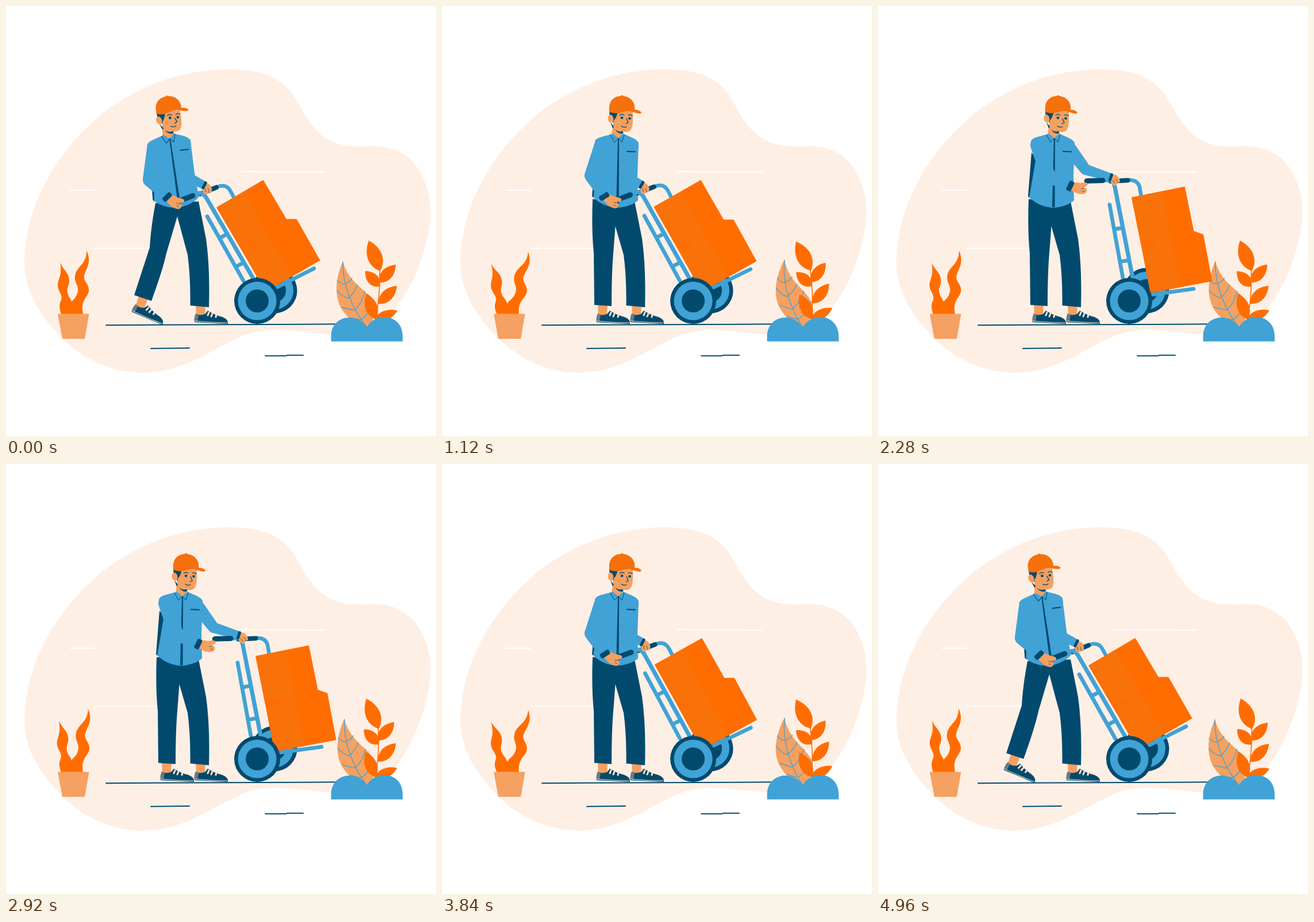
An HTML page that plays this animation: 748x748 px, repeating every 5 s.

```html
<!DOCTYPE html>
<html lang="en">
<head>
<meta charset="utf-8">
<title>Courier with hand truck</title>
<style>
  html, body { margin: 0; width: 100%; height: 100%; overflow: hidden; background: #fff; }
  svg { display: block; width: 100%; height: 100%; }
  .navy { fill: #014a6e; } .blue { fill: #41a2d6; } .orange { fill: #ff6d00; }
  .cap { fill: #f6700c; } .skin { fill: #f3a061; }
  .line { fill: none; stroke-linecap: round; stroke-linejoin: round; }
  .sNavy { stroke: #014a6e; } .sBlue { stroke: #41a2d6; }
</style>
</head>
<body>
<svg viewBox="0 0 748 748">
  <defs>
    <g id="shoe">
      <path class="skin" d="M-9-5 8-3 7 16-8 16Z"/>
      <path class="navy" d="M-9 13C-11 18-12 23-11 28L47 31C48 24 42 20 34 18 26 16 19 12 12 8L7 14C1 16-5 16-9 13Z"/>
      <path fill="#6c7a85" d="M-9 13C-11 18-12 23-11 27L-6 27-4 15Z"/>
      <path class="line" stroke="#fbd9bd" d="M-10 26Q18 29 46 29"/>
      <path class="line" stroke="#ffe3c8" stroke-width="3" d="M14 11 12 16M20 13 18 18M27 14 26 19"/>
    </g>
  </defs>

  <path fill="#feefe5" d="M380 110C440 109 480 122 503 160 528 205 546 240 603 244 640 246 660 238 692 258 728 282 742 330 738 375 731 428 709 488 674 531 645 566 600 574 560 571 520 568 480 561 445 565 380 573 330 638 235 638 180 637 130 612 95 575 60 540 30 495 32 440 36 340 90 250 170 185 230 140 300 112 380 110Z"/>
  <path class="line" stroke="#fff" stroke-width="2" d="M112 320.500H154M410 288 556 289M155 421.500H264"/>
  <path class="line sNavy" stroke-width="2" d="M174 555.200 580 553.300M252 595.700 319 595M451 608.500H487L489 607.600H517"/>

  <path id="flameL" class="orange" d="M94 446C100 460 110 464 110 478 110 487 105 490 107 499 109 507 112 508 114 514L124 536H96C93 527 92 521 95 514 101 502 89 497 90 484 91 474 98 468 94 446Z"/>
  <path id="flameR" class="orange" d="M140 425C152 450 134 461 136 474 138 482 145 485 144 496 142 508 129 511 134 536H106L114 514C119 510 126 502 125 491 124 484 119 480 120 470 122 452 141 450 140 425Z"/>
  <path fill="#f4a162" d="M90 535.500H144.500L137 579H98Z"/>

  <g id="tanLeaf">
    <path fill="#f4a162" d="M586 444C572 476 571 508 585 529 596 545 611 554 627 560 637 552 645 537 641 520 634 494 597 487 586 444Z"/>
    <path class="line sBlue" stroke-width="1.300" d="M586 445C585 483 602 527 627 558M576 477Q580 483 589 484Q600 479 602 473M576 495Q583 505 596 508Q607 498 611 485M584 524Q595 527 606 529Q620 517 624 496M598 542Q607 544 617 546Q632 537 638 513"/>
  </g>
  <g id="branch" class="orange"></g>
  <path class="blue" d="M565.500 583.500V574C566 554 580 542 597 542 610 542 621 548 627.500 559 634 548 644 541 658 541 676 541 690 554 690 574V583.500Z"/>

  <use id="rearShoe" href="#shoe"/>
  <use href="#shoe" x="339" y="522"/>
  <path id="legs" class="navy"/>
  <path id="rearArm" class="blue"/>

  <g id="torso">
    <path class="skin" d="M298 204 295 224 307 231 316 222 313 210Z"/>
    <path class="navy" d="M293 202 299 210 297 213ZM301 214Q307 221 316 217L314 222Q306 223 301 214Z"/>
    <path class="blue" d="M297 222C285 227 270 227 266 235L274 268 262 332C275 345 290 350 305 351 320 350 334 345 341 338L340 295 342 238C338 230 325 227 315 222L307 230Z"/>
    <path class="navy" d="M267 255 275 264 263 333 261 331Z"/>
    <path class="navy" d="M306 230H308L307.500 350H303Z"/>
    <path class="line sNavy" d="M293 224 300 237 307 230 313 237 317 224"/>
    <path class="line sNavy" stroke-width="2" d="M322 253 336 253.500"/>
    <path class="navy" d="M291 181H308L303 200 299 205 291.500 190Z"/>
    <path class="skin" d="M302 183 332 184C332 198 333 211 327 217 320 222 308 218 303 211L298 204Z"/>
    <ellipse class="skin" cx="293.500" cy="196" rx="5" ry="7" transform="rotate(-12 293.500 196)"/>
    <path class="navy" d="M296 183H306Q304 194 299 199Z"/>
    <circle class="navy" cx="313" cy="194.500" r="2.300"/><circle class="navy" cx="326.500" cy="195.500" r="2.300"/>
    <path class="line sNavy" stroke-width="1.300" d="M309 190Q313 187 317 190M324 190Q328 188 331 191M321 196 324 203 320 205M312 209Q316 212 321 210"/>
    <path class="cap" d="M291.500 184C288 165 300 157 311 156.500Q313 154 315.500 156.500C328 158 337 168 335 180.500 341 180 346 183 347 185.500 345 188.500 340 187 334 185 321 180 310 187 301 186.500 296 186 293 185 291.500 184Z"/>
  </g>

  <circle class="navy" cx="467" cy="495" r="39.500"/><circle class="blue" cx="467" cy="495" r="33"/><circle class="navy" cx="467" cy="495" r="20"/>
  <g id="cart">
    <path class="line sBlue" stroke-width="6.500" d="M368 314.500C380 310 387 315 391 323L405 349"/>
    <path class="line sNavy" stroke-width="8" d="M338 327 366 315.500"/>
    <path class="line sBlue" stroke-width="6.500" d="M472 489 536 456.500"/>
    <g id="boxes">
      <path class="orange" stroke="#ff6d00" stroke-width="3" stroke-linejoin="round" d="M368 351 447 304.500 487 372 504.500 372 544.500 442 452 495 411 424 408.500 420Z"/>
      <path fill="#f97109" d="M367 350 414 323 455 397 498 470 452 497 410 424Z"/>
      <ellipse class="orange" cx="424" cy="417" rx="11" ry="6" transform="rotate(-30 424 417)"/>
    </g>
    <path class="line sBlue" stroke-width="7.300" d="M326 329.500 333 326.500C340 323 344 327 348 333L433 479"/>
    <path class="line sBlue" stroke-width="6.700" d="M350 366 413 478M373 403 384 397M401 453 412 447"/>
    <path class="line sNavy" stroke-width="9" d="M299 340 325 330"/>
  </g>
  <circle class="navy" cx="437" cy="513" r="40"/><circle class="blue" cx="437" cy="513" r="33.500"/><circle class="navy" cx="437" cy="513" r="20"/>

  <g id="rearHand">
    <path class="skin" d="M2-6C8-8 16-3 17 2 18 6 14 6 13 4 15 11 10 14 5 11L1 6Z"/>
    <path class="line" stroke="#014a6e" stroke-width=".7" d="M13 4 9 1M9 8 5 4"/>
  </g>
  <path id="rearCuff" class="line sNavy" stroke-width="5" d="M0-5V5"/>
  <path id="frontArm" class="blue"/>
  <g id="frontHand">
    <path class="skin" d="M3-7 18-7C24-8 29-10 30.500-6 31-2 25-2 25 1L29 2C32 6 29 12 23 12 14 14 8 9 3 8Z"/>
    <path class="line" stroke="#014a6e" stroke-width=".7" d="M25 2 20 3M26 7 22 7"/>
  </g>
  <rect id="frontCuff" class="navy" x="-4" y="-9" width="9" height="18" rx="3"/>
</svg>
<script>
const LOOP = 5000, HUB = [437, 513], HIP = [300, 370];
const el = id => document.getElementById(id);
const place = (id, value) => el(id).setAttribute('transform', value);
const draw = (id, d) => el(id).setAttribute('d', d);
const mix = (a, b, k) => a.map((v, i) => v + (b[i] - v) * k);
const add = (a, b) => [a[0] + b[0], a[1] + b[1]];
const deg = (a, b) => Math.atan2(b[1] - a[1], b[0] - a[0]) * 180 / Math.PI;

function spin([x, y], [cx, cy], angle) {
  const r = angle * Math.PI / 180, c = Math.cos(r), s = Math.sin(r);
  return [cx + (x - cx) * c - (y - cy) * s, cy + (x - cx) * s + (y - cy) * c];
}

function ramp(t, from, to) {
  const k = Math.min(1, Math.max(0, (t - from) / (to - from)));
  return k * k * (3 - 2 * k);
}

function leaf(base, tip, w) {
  const dx = tip[0] - base[0], dy = tip[1] - base[1], len = Math.hypot(dx, dy);
  const at = (k, side) => [base[0] + dx * k - dy / len * w * side, base[1] + dy * k + dx / len * w * side];
  return `M${base}C${at(.25, 1)} ${at(.65, 1)} ${tip}C${at(.65, -1)} ${at(.25, -1)} ${base}Z`;
}

// Elbow of a two-bone arm, bent backwards
function elbowOf(a, b, upper, lower) {
  const dx = b[0] - a[0], dy = b[1] - a[1], d = Math.hypot(dx, dy);
  const k = (upper * upper - lower * lower + d * d) / (2 * d);
  const h = Math.sqrt(Math.max(0, upper * upper - k * k));
  return [a[0] + (dx * k - dy * h) / d, a[1] + (dy * k + dx * h) / d];
}

// Tapered limb with a round start
function limb(a, ra, b, rb) {
  const d = Math.hypot(b[0] - a[0], b[1] - a[1]);
  const n = [-(b[1] - a[1]) / d, (b[0] - a[0]) / d];
  const off = (p, r) => [p[0] + n[0] * r, p[1] + n[1] * r];
  return `M${off(a, ra)}A${ra} ${ra} 0 0 1 ${off(a, -ra)}L${off(b, -rb)} ${off(b, rb)}Z`;
}

function poseArm(name, shoulder, cuff, upper, lower, rShoulder, rElbow, rCuff) {
  const elbow = elbowOf(shoulder, cuff, upper, lower);
  draw(name + 'Arm', limb(shoulder, rShoulder, elbow, rElbow) + limb(elbow, rElbow, cuff, rCuff));
  place(name + 'Cuff', `translate(${cuff}) rotate(${deg(elbow, cuff)})`);
}

// Base, tip and half width of each leaf
el('branch').innerHTML = '<path class="line" stroke="#ff6d00" stroke-width="1.6" d="M642 546Q651 510 650 458"/>' + [
  [[651, 461], [631, 408], 17], [[649, 481], [678, 450], 13], [[650, 488], [625, 461], 13],
  [[648, 518], [680, 487], 13], [[643, 545], [627, 500], 14], [[641, 546], [681, 530], 11]
].map(a => `<path d="${leaf(...a)}"/>`).join('');

function render(t) {
  const upright = ramp(t, 0, 1000) - ramp(t, 4000, 5000);
  const push = ramp(t, 1000, 2000) - ramp(t, 3000, 4000);
  const slide = 20 * (ramp(t, 1500, 2460) - ramp(t, 2460, 3460));
  const u = t % 2500, sway = ramp(u, 0, 1250) - ramp(u, 1250, 2500);
  const lean = -9 * (1 - upright), tilt = 19.1 * push;

  place('flameL', `rotate(${-5.8 * sway} 112 536)`);
  place('flameR', `rotate(${5.2 * sway} 118 536)`);
  place('tanLeaf', `rotate(${5 * sway} 627 559)`);
  place('branch', `rotate(${-6.5 * sway} 640 545)`);

  place('torso', `rotate(${lean} ${HIP})`);
  place('rearShoe', `translate(${mix([238.5, 509.5], [280, 522], upright)}) rotate(${20 * (1 - upright)})`);
  const at = (x0, y0, x1, y1) => mix([x0, y0], [x1, y1], upright);
  draw('legs', `M${at(260, 343, 262, 336)}Q${at(252, 385, 260, 390)} ${at(250, 420, 264, 430)}` +
    `L${at(223, 503, 265, 520)} ${at(253, 513, 295, 522)}Q${at(273, 458, 295, 465)} ${at(279, 430, 298, 430)}` +
    `L${at(298, 366, 301.5, 383)} 316 433Q321 470 320.500 521L353 524Q355 455 348 405L335 340Z`);

  place('cart', `rotate(${tilt} ${HUB})`);
  place('boxes', `translate(${slide * .866} ${slide * -.5})`);

  const frontCuff = add(spin([301, 339], HUB, tilt), mix([-21, -7], [-31.5, 9], push));
  const rearCuff = add(spin([350, 320], HUB, tilt), mix([-5, -8], [-13, -4], push));
  poseArm('front', spin([279, 242], HIP, lean), frontCuff, 56, 42, 14, 12.5, 9);
  poseArm('rear', spin([330, 244], HIP, lean), rearCuff, 51, 46, 12, 9.5, 7);
  place('frontHand', `translate(${frontCuff}) rotate(${25 - 20 * push})`);
  place('rearHand', `translate(${rearCuff}) rotate(${35 - 20 * push})`);
}

function tick() {
  render(performance.now() % LOOP);
  requestAnimationFrame(tick);
}
tick();
</script>
</body>
</html>
```
